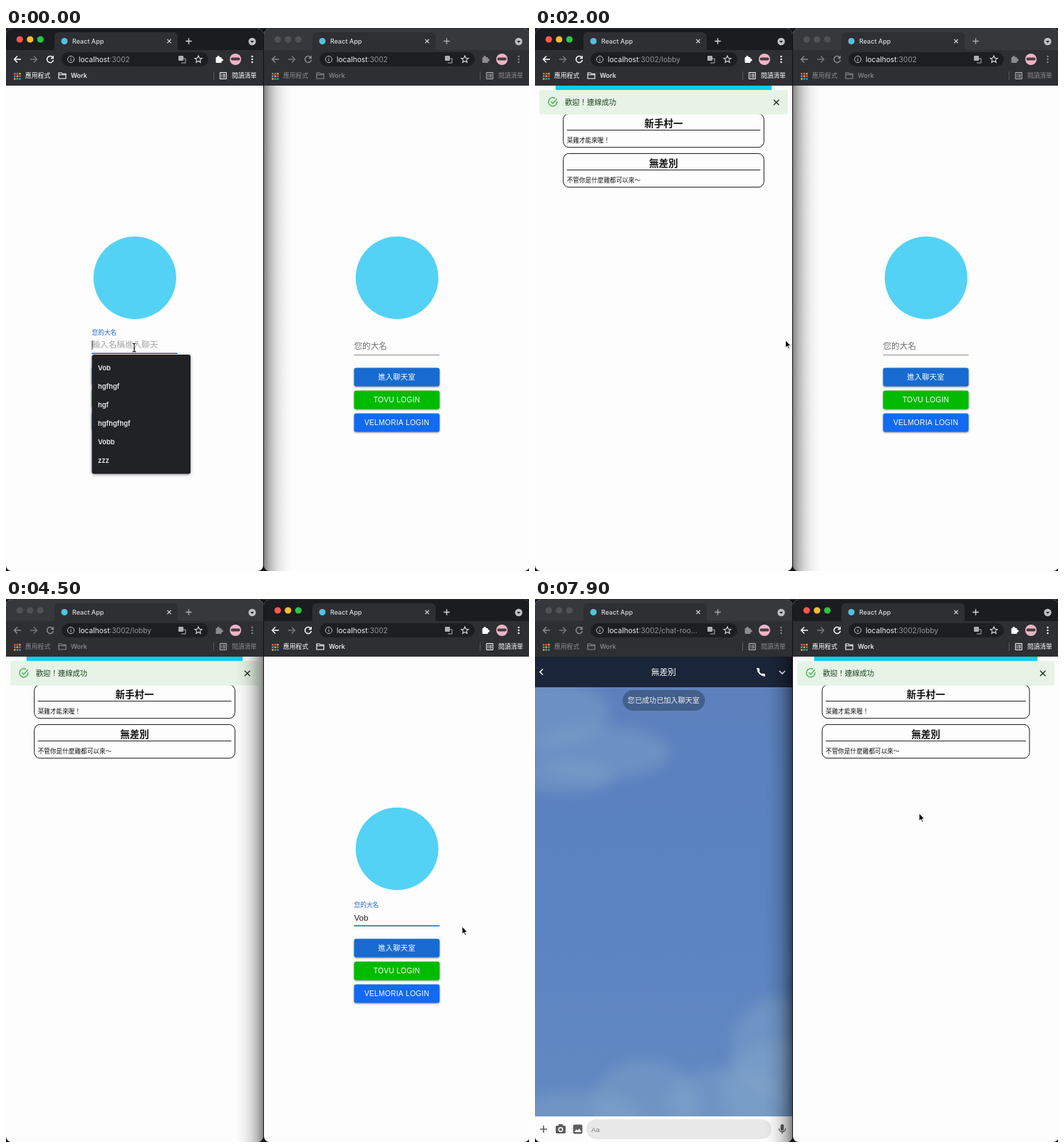
These frames come from a looping animation (734 by 763 pixels, 8 s). An HTML page with a canvas:

```html
<!DOCTYPE html>
<html lang="zh-Hant">
<head>
<meta charset="utf-8">
<title>Chat demo</title>
<style>
html, body { margin: 0; width: 100%; height: 100%; overflow: hidden; background: #111; }
canvas { display: block; }
</style>
</head>
<body>
<canvas id="stage" width="734" height="763"></canvas>
<script>
const c = document.getElementById('stage').getContext('2d');
const LOOP = 8000, H = 763;
const UI = 'Inter, "Noto Sans CJK TC", "Noto Sans CJK", sans-serif';
const PAGE = '"Liberation Sans", "Noto Sans CJK TC", "Noto Sans CJK", sans-serif';
const NAME = 'Vob';
const NAMES = [NAME, 'hgfhgf', 'hgf', 'hgfhgfhgf', 'Vobb', 'zzz'];
const ROOMS = [['新手村一', '菜雞才能來喔！', 120], ['無差別', '不管你是什麼雞都可以來～', 176]];

// Times in ms: field focus, list open and pick, field blur, page changes
const LEFT = { x: 0, w: 361, dy: 0, focus: -500, open: -400, pick: 520, blur: 884, enter: 1620, chat: 7080 };
const RIGHT = { x: 362, w: 373, dy: 2, focus: 3200, open: 3300, pick: 4150, blur: 4600, enter: 5190, chat: Infinity };
const leftActive = t => t < 2650 || (t >= 5900 && t < 7600);

// Pointer tip: time, x, y
const TRACK = [
  [0, 180, 449], [200, 180, 449], [430, 176, 479], [560, 176, 479], [820, 275.5, 449.5],
  [950, 275.5, 449.5], [1300, 190, 489], [1600, 190, 489], [2000, 351.5, 438.5], [2500, 490, 430],
  [2900, 512, 448], [3700, 512, 448], [3950, 522, 481], [4180, 522, 481], [4450, 640, 460],
  [4650, 640, 460], [4950, 560, 491], [5150, 560, 491], [5300, 569.5, 500], [5550, 500, 420],
  [5900, 270, 290], [6350, 209.5, 200], [7100, 209.5, 200], [7550, 539, 301], [8000, 539, 301]
];

function bezier(x1, x2, t) {
  if (t <= 0) return 0;
  if (t >= 1) return 1;
  let lo = 0, hi = 1, s = .5;
  for (let i = 0; i < 18; i++) {
    s = (lo + hi) / 2;
    const x = 3 * s * (1 - s) * (x1 * (1 - s) + x2 * s) + s ** 3;
    if (x < t) lo = s; else hi = s;
  }
  return s * s * (3 - 2 * s);
}
const standard = t => bezier(.4, .2, t);
const easeOut = t => bezier(0, .2, t);
const mix = (a, b, k) => a + (b - a) * k;

function pointer(t) {
  let i = 1;
  while (TRACK[i][0] < t) i++;
  const [ta, xa, ya] = TRACK[i - 1], [tb, xb, yb] = TRACK[i];
  const p = (t - ta) / (tb - ta), k = p * p * (3 - 2 * p);
  return { x: mix(xa, xb, k), y: mix(ya, yb, k) };
}

function rect(x, y, w, h, color, r = 0) {
  c.fillStyle = color;
  c.beginPath();
  c.roundRect(x, y, w, h, r);
  c.fill();
}
function dot(x, y, r, color) {
  c.fillStyle = color;
  c.beginPath();
  c.arc(x, y, r, 0, 7);
  c.fill();
}
// y is the vertical middle of the glyphs
function text(s, x, y, size, color, { weight = 400, align = 'left', font = PAGE, spacing = 0 } = {}) {
  c.font = `${weight} ${size}px ${font}`;
  c.textAlign = align;
  c.letterSpacing = spacing + 'px';
  c.fillStyle = color;
  c.fillText(s, x, y + size * .37);
  return c.measureText(s).width;
}
function icon(d, x, y, stroke, width = 1.3, fill) {
  c.save();
  c.translate(x, y);
  const p = new Path2D(d);
  if (fill) { c.fillStyle = fill; c.fill(p); }
  if (stroke) { c.strokeStyle = stroke; c.lineWidth = width; c.stroke(p); }
  c.restore();
}
const cross = (x, y, r, color, w) => icon(`M${-r} ${-r}L${r} ${r}M${r} ${-r}L${-r} ${r}`, x, y, color, w);
const plus = (x, y, r, color, w) => icon(`M${-r} 0H${r}M0 ${-r}V${r}`, x, y, color, w);

function drawChrome(w, active, path) {
  const on = active ? '#fff' : '#8b8c90', light = '#d8d9dc', bar = '#2e2f32';
  const R = w - 361;
  rect(0, 0, w, 32, active ? '#1b1c1f' : '#37383b');
  rect(0, 31, w, 50, bar);
  rect(68, 6, 173, 30, bar, 6);
  ['#fe5850', '#febb2e', '#29c740'].forEach((k, i) => dot(19.3 + i * 14.5, 16, 4.6, active ? k : '#505155'));
  dot(82, 18.5, 4.5, '#53c1de');
  text('React App', 93, 18.5, 9, light, { font: UI, weight: 500 });
  cross(229, 18.5, 2.6, light, 1.3);
  plus(256.5, 18.5, 4.2, active ? light : '#aaabae', 1.3);
  dot(345.5 + R, 19, 5.2, '#bfc0c3');
  icon('M-2.5 -1H2.5L0 2Z', 345.5 + R, 19, 0, 0, '#202124');

  icon('M5 0H-4M0 -4.5L-4.5 0L0 4.5', 16, 44, on, 1.5);
  icon('M-5 0H4M0 -4.5L4.5 0L0 4.5', 39, 44, '#76777b', 1.4);
  icon('M3.6 -2.8A4.5 4.5 0 1 0 4.5 1', 62, 44, on, 1.5);
  icon('M5 -5.5V-.8H.3Z', 62, 44, 0, 0, on);
  rect(78, 34, 206 + R, 20, '#1d1e21', 10);
  icon('M4.6 0A4.6 4.6 0 1 1 -4.6 0A4.6 4.6 0 1 1 4.6 0M0 -.7V2.6M0 -2.6V-1.5', 91, 44, '#bfc0c3', 1);
  const host = text('localhost', 102, 44, 10.2, '#f1f1f2', { font: UI });
  text(':3002' + path, 102 + host, 44, 10.2, '#96979b', { font: UI });
  rect(242 + R, 39, 7, 7, '#aeafb2', 1);
  icon('M0 0H5V6H-1', 247 + R, 43, '#aeafb2', 1);
  icon('M0 -5L1.4 -1.7L5 -1.4L2.3 .9L3.1 4.4L0 2.5L-3.1 4.4L-2.3 .9L-5 -1.4L-1.4 -1.7Z', 270 + R, 44, light, 1.1);
  rect(294.5 + R, 41, 8, 8, on, 1);
  dot(298 + R, 40.8, 1.8, on);
  dot(303 + R, 45, 1.8, on);
  dot(322 + R, 44, 8, '#efb5c5');
  rect(315.5 + R, 41.5, 13, 4, '#4a3b43', 2);
  [-4, 0, 4].forEach(d => dot(345.5 + R, 44 + d, 1.2, on));

  for (let i = 0; i < 9; i++) {
    const k = ['#d9584b', '#d9584b', '#e5a33c', '#48a867', '#4c8de0', '#e5a33c'][(i + (i / 3 | 0)) % 6];
    rect(11 + i % 3 * 3.6, 63 + (i / 3 | 0) * 3.6, 2.5, 2.5, k);
  }
  const opt = { font: UI, weight: 500 };
  text('應用程式', 27, 67, 8.8, on, opt);
  icon('M-5 -4H-1L0 -2.7H5V4H-5ZM-5 -1.3H5', 79, 67, on, 1.1);
  text('Work', 91, 67, 9, on, opt);
  rect(291 + R, 61, 1, 12, '#5a5b5f');
  icon('M-4.5 -4.5H4.5V4.5H-4.5ZM-3 -2H-1.5M-.5 -2H3M-3 0H-1.5M-.5 0H3M-3 2H-1.5M-.5 2H3', 304.8 + R, 67, active ? '#fff' : '#bcbdc0', 1);
  text('閱讀清單', 317 + R, 67, 8.7, on, opt);
}

function button(x, y, color, label) {
  c.save();
  c.shadowColor = 'rgba(0,0,0,.4)';
  c.shadowBlur = 2.5;
  c.shadowOffsetY = 1.2;
  rect(x, y, 120, 26, color, 3);
  c.restore();
  text(label, x + 60, y + 13, 10.2, '#fff', { align: 'center', spacing: .28, weight: label[0] > 'Z' ? 500 : 400 });
}

function drawLogin(win, t, mouse) {
  const x = win.w / 2 - 60, focused = t >= win.focus && t < win.blur;
  const filled = t >= win.pick, up = easeOut((t - win.focus) / 200);
  dot(win.w / 2 + .3, 351, 58, '#53d2f5');
  c.save();
  c.translate(0, win.dy);
  const labelColor = t >= win.focus && t < win.blur + 60 ? '#1769c5' : '#707070';
  text('您的大名', x, mix(445, 428, up), mix(11.6, 8.7, up), labelColor);
  if (filled) text(NAME, x, 445.5, 11.6, '#1c1c1c');
  else if (up) {
    c.globalAlpha = up;
    text('輸入名稱進入聊天', x, 445, 11.6, '#a4a4a4');
    c.globalAlpha = 1;
  }
  if (focused && !filled) rect(x, 439, 1, 13, '#222');
  rect(x, 457, 120, 1, '#8b8b8b');
  const glow = t < win.blur ? up : 1 - easeOut((t - win.blur) / 200);
  rect(x + 60 - 60 * glow, 456.4, 120 * glow, 1.6, '#1764c6');
  button(x, 475.5, '#176bd0', '進入聊天室');
  button(x, 507.5, '#00bb00', 'TOVU LOGIN');
  button(x, 539.5, '#126af2', 'VELMORIA LOGIN');

  if (t >= win.open && t < win.pick) {
    c.save();
    c.shadowColor = 'rgba(0,0,0,.4)';
    c.shadowBlur = 4;
    c.shadowOffsetY = 1;
    rect(x, 459, 138.5, 167.5, '#212226', 3);
    c.restore();
    NAMES.forEach((name, i) => {
      const y = 478 + i * 26;
      if (Math.abs(mouse.y - win.dy - y) < 13) rect(x, y - 13, 138.5, 26, '#3b3c41');
      text(name, x + 8.5, y, 9.4, '#eee', { font: UI, weight: 600 });
    });
  }
  c.restore();
}

function drawSnack(w, age) {
  const k = standard(age / 150);
  c.save();
  c.globalAlpha = standard(age / 225);
  c.translate(w / 2, 104);
  c.scale(mix(.75, 1, k), mix(.5625, 1, k));
  c.translate(-w / 2, -104);
  rect(6, 87, w - 12, 34.5, '#e6f3e6', 3);
  icon('M5.6 -1A6 6 0 1 1 2.8 -5.3M-3 -.7L-.5 2L5.6 -4.6', 25.3, 104, '#4caf50', 1.4);
  text('歡迎！連線成功', 42, 104, 10.3, '#1e4620');
  cross(w - 22.3, 104.5, 3.8, '#1d2f1e', 1.3);
  c.restore();
}

function drawLobby(win, t, mouse, active) {
  const { w } = win, mid = w / 2, half = w * .39;
  rect(w * .08, 81, w * .84, 27, '#08cdf8');
  text('Lobby', mid, 95, 11.5, '#fff', { align: 'center', spacing: 3.7 });
  icon('M-6.5 -4H6.5M-6.5 0H6.5M-6.5 4H6.5', w - 46, 96, '#fff', 1.3);
  ROOMS.forEach(([name, note, y]) => {
    const over = active && Math.abs(mouse.x - mid) < half && mouse.y > y && mouse.y < y + 48;
    c.save();
    c.translate(mid, y + 24);
    if (over) c.scale(.99, .99);
    c.beginPath();
    c.roundRect(-half, -23.6, half * 2, 47.3, 8);
    c.fillStyle = over ? '#e2e2e2' : '#fdfdfd';
    c.fill();
    c.strokeStyle = '#161616';
    c.lineWidth = 1;
    c.stroke();
    text(name, 0, -10, 13.5, '#111', { weight: 700, align: 'center' });
    rect(5 - half, -1, half * 2 - 10, 1, '#222');
    text(note, 5 - half, 13.4, 8.65, '#111');
    c.restore();
  });
  drawSnack(w, t - win.enter - 28);
}

function drawChat(w) {
  const sky = c.createLinearGradient(0, 124, 0, 727);
  sky.addColorStop(0, '#5c81bd');
  sky.addColorStop(.5, '#5b83c2');
  sky.addColorStop(1, '#6289c0');
  rect(0, 81, w, 682, sky);
  c.save();
  c.filter = 'blur(9px)';
  c.fillStyle = 'rgba(134,167,203,.4)';
  for (const [x, y, rx, ry] of [[20, 160, 85, 45], [90, 215, 100, 38], [45, 250, 65, 22],
    [60, 735, 90, 45], [155, 710, 75, 62], [270, 705, 85, 45], [345, 630, 70, 70], [355, 690, 95, 70]]) {
    c.beginPath();
    c.ellipse(x, y, rx, ry, 0, 0, 7);
    c.fill();
  }
  c.restore();
  rect(0, 81, w, 43, '#1b2539');
  icon('M2 -4L-2 0L2 4', 9, 102.5, '#fff', 1.6);
  text('無差別', w / 2, 102.5, 11.6, '#fff', { align: 'center' });
  icon('M-4.5 -6Q-4 4 6 4.5', 317, 103, '#fff', 2);
  icon('M-6 -6H-2.5L-1.5 -2L-4 0ZM6 6V2.5L2 1.5L0 4Z', 317, 103, 0, 0, '#fff');
  icon('M-4 -2L0 2L4 -2', 347, 103, '#fff', 1.7);
  rect(123, 128, 115.5, 29, 'rgba(57,82,121,.72)', 14.5);
  text('您已成功已加入聊天室', w / 2, 142.5, 10.1, '#f0f2f5', { align: 'center' });

  const ink = '#5d5d60';
  rect(0, 727, w, 36, '#fdfdfd');
  plus(12, 745, 5, ink, 1.6);
  rect(29, 740, 14, 11, ink, 2);
  rect(33, 738, 6, 4, ink, 1);
  dot(36, 745.5, 3.4, '#fdfdfd');
  dot(36, 745.5, 2, ink);
  rect(53.5, 738.5, 13, 13, ink, 2);
  icon('M-5 4L-2 0L0 2L2 -1L5 4Z', 60, 745, 0, 0, '#fdfdfd');
  rect(72, 731, 260, 28, '#e8e8e9', 14);
  text('Aa', 79, 745, 9.7, '#808083');
  rect(344.6, 738, 4.6, 9, ink, 2.3);
  icon('M-4.5 0A4.5 4.5 0 0 0 4.5 0M0 4.5V7.5', 347, 744, ink, 1.4);
}

function drawWindow(win, t, active, mouse) {
  const { w } = win, local = { x: mouse.x - win.x, y: mouse.y };
  c.save();
  c.translate(win.x, 0);
  c.beginPath();
  c.roundRect(0, 1, w, H - 1, 8);
  c.clip();
  rect(0, 0, w, H, '#fdfdfd');
  if (t >= win.chat) drawChat(w);
  else if (t >= win.enter) drawLobby(win, t, local, active);
  else drawLogin(win, t, local);
  drawChrome(w, active, t >= win.chat ? '/chat-roo...' : t >= win.enter ? '/lobby' : '');
  if (!active) {
    const from = win === LEFT ? w : 0, to = win === LEFT ? w - 40 : 40;
    const shade = c.createLinearGradient(from, 0, to, 0);
    [.48, .28, .15, .07, .025, 0].forEach((a, i) => shade.addColorStop(i / 5, `rgba(0,0,0,${a})`));
    rect(0, 81, w, H - 81, shade);
  }
  c.restore();
}

function drawPointer(t, { x, y }) {
  const win = x < 361.5 ? LEFT : RIGHT, dx = x - win.x - win.w / 2, ly = y - win.dy;
  const active = leftActive(t) === (win === LEFT);
  const login = t < win.enter, listed = t >= win.open && t < win.pick;
  const inRow = Math.abs(dx) < 60;
  if (login && inRow && ly > 435 && ly < 458) {
    icon('M-2.5 -6Q0 -6 0 -4Q0 -6 2.5 -6M0 -4V4M-2.5 6Q0 6 0 4Q0 6 2.5 6M-1 1.5H1', x, y, '#111', 1.1);
    return;
  }
  const onButton = login && !listed && inRow && ly > 475 && ly < 566 && (ly - 475) % 32 < 26;
  const onRoom = !login && t < win.chat && Math.abs(dx) < win.w * .39 && y > 120 && y < 224;
  if (active && (onButton || onRoom))
    icon('M-1.2 0Q0 -1.2 1.2 0V4Q3 3.4 3.3 4.8Q5 4.2 5.2 5.6Q7 5.2 7 7V9L5.6 12H-.5Q-2.6 9.5 -4 7Q-4 5.5 -2.6 6L-1.2 7.3Z', x, y, '#111', 1, '#fff');
  else
    icon('M0 0V11L2.5 8.7L4.2 12.5L5.9 11.8L4.3 8.1H7.6Z', x, y, '#fff', 1, '#0b0b0b');
}

function draw(t) {
  rect(0, 0, 734, H, '#111216');
  rect(0, 0, 734, 1, '#2a2b4c');
  const mouse = pointer(t), left = leftActive(t);
  drawWindow(LEFT, t, left, mouse);
  drawWindow(RIGHT, t, !left, mouse);
  drawPointer(t, mouse);
}

const start = performance.now();
function frame() {
  draw((performance.now() - start) % LOOP);
  requestAnimationFrame(frame);
}
frame();
</script>
</body>
</html>
```
